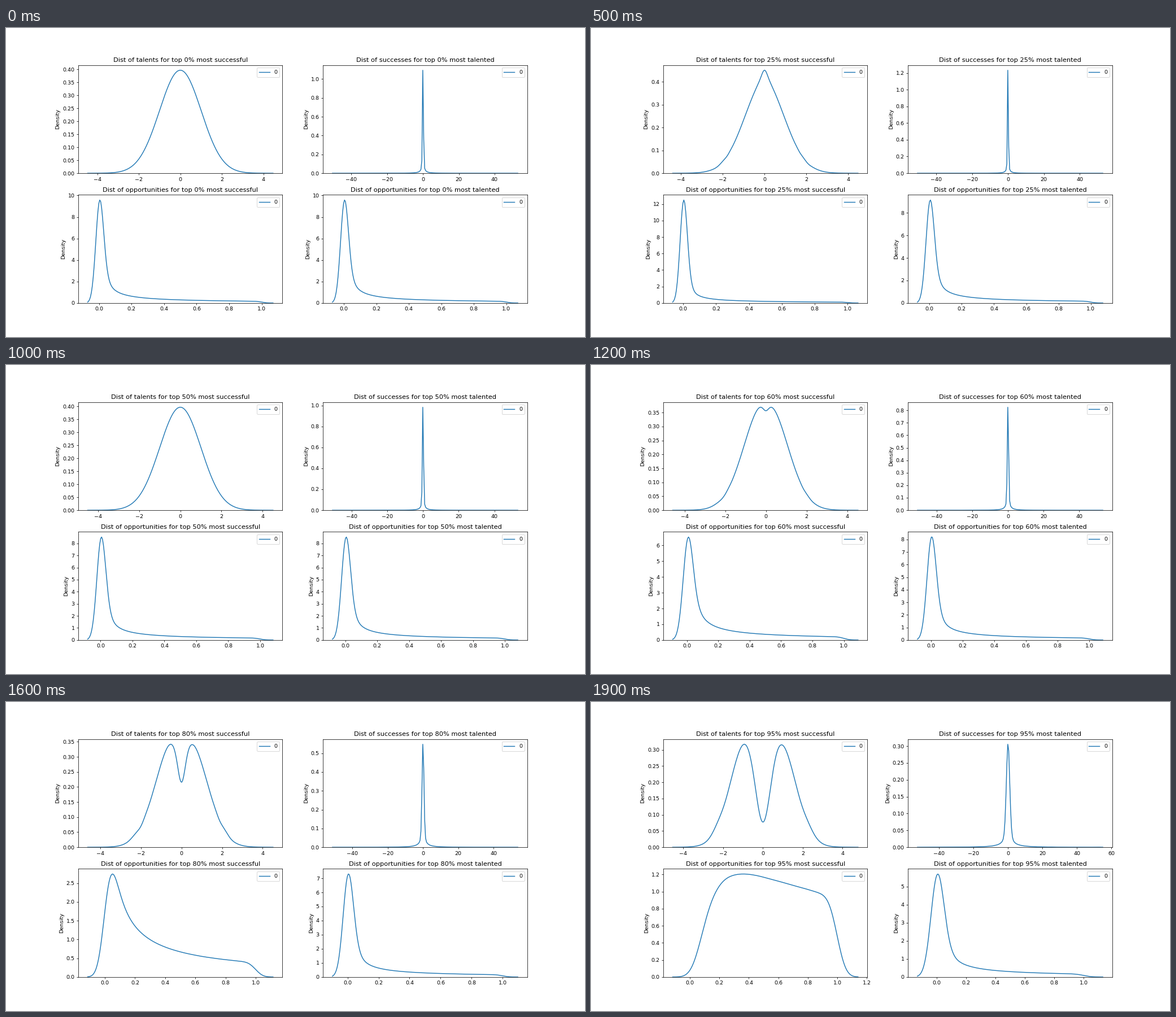
These frames come from a looping animation (1025x547 px, 2 s). A matplotlib script:

```python
import numpy as np
import matplotlib.pyplot as plt
from matplotlib.animation import FuncAnimation

WIDTH, HEIGHT = 1025, 547
DPI = WIDTH / 15
FRAMES = 20
PEOPLE = 50_000
SAMPLES = 300_000
GRID = 200
BINS = 3000

plt.rcParams["font.family"] = "DejaVu Sans"


def even_points(count):
    """Evenly scattered points in the unit cube."""
    ratio = 1.2207440846
    i = np.arange(1, count + 1)
    return [(0.5 + i / ratio**k) % 1 for k in (1, 2, 3)]


def to_normal(u):
    z = np.linspace(-6, 6, 6001)
    cdf = np.cumsum(np.exp(-z**2 / 2))
    return np.interp(u, cdf / cdf[-1], z)


def tail_rank(values):
    """Share of people with a larger magnitude."""
    order = np.argsort(-np.abs(values))
    rank = np.empty(len(values))
    rank[order] = np.arange(len(values)) / len(values)
    return rank


# Success is talent times opportunity times luck.
u, v, w = even_points(SAMPLES)
talent = to_normal(u)
chance = v**6.2
luck = -np.log(1 - w)
success = 6.5 * talent * chance * luck


def selection(rank, p):
    """Upper and lower groups joined; they overlap below one half."""
    tail = rank < 2 * min(p, 1 - p)
    return 2.0 - tail if p < 0.5 else 1.0 * tail


def density(bins, centres, weights):
    """Gaussian kernel estimate on a grid reaching three widths past the data."""
    hist = np.bincount(bins, weights, minlength=BINS)
    hist /= hist.sum()
    mean = hist @ centres
    spread = np.sqrt(hist @ (centres - mean) ** 2)
    bw = spread * (PEOPLE * weights.mean()) ** -0.2

    edge = 0.5 / (PEOPLE * np.mean(weights > 0))
    low, high = centres[np.searchsorted(np.cumsum(hist), [edge, 1 - edge])]
    x = np.linspace(low - 3 * bw, high + 3 * bw, GRID)
    kernel = np.exp(-((x[:, None] - centres) / bw) ** 2 / 2)
    return x, kernel @ hist / (bw * np.sqrt(2 * np.pi))


def curves(values, rank, low, high):
    step = (high - low) / BINS
    bins = np.clip((values - low) / step, 0, BINS - 1).astype(int)
    centres = low + step * (np.arange(BINS) + 0.5)
    return [density(bins, centres, selection(rank, i / FRAMES))
            for i in range(FRAMES)]


by_success, by_talent = tail_rank(success), tail_rank(talent)
PANELS = [
    ("talents", "successful", curves(talent, by_success, -4.25, 4.17)),
    ("successes", "talented", curves(success, by_talent, -49.9, 52.3)),
    ("opportunities", "successful", curves(chance, by_success, 0, 1)),
    ("opportunities", "talented", curves(chance, by_talent, 0, 1)),
]

fig, axes = plt.subplots(
    2, 2, dpi=DPI, figsize=((WIDTH + 0.01) / DPI, (HEIGHT + 0.01) / DPI))


def draw(i):
    for ax, (what, group, frames) in zip(axes.flat, PANELS):
        x, y = frames[i]
        ax.clear()
        ax.plot(x, y, color="#1f77b4", lw=1.5, label="0")
        ax.margins(x=0.05)
        ax.set_ylim(0, 1.05 * y.max())
        ax.set_ylabel("Density")
        ax.set_title(f"Dist of {what} for top {5 * i}% most {group}")
        ax.legend(loc="upper right")
    return []


anim = FuncAnimation(fig, draw, frames=FRAMES, init_func=lambda: draw(0),
                     interval=100, repeat=True, repeat_delay=0)
plt.show()
```
